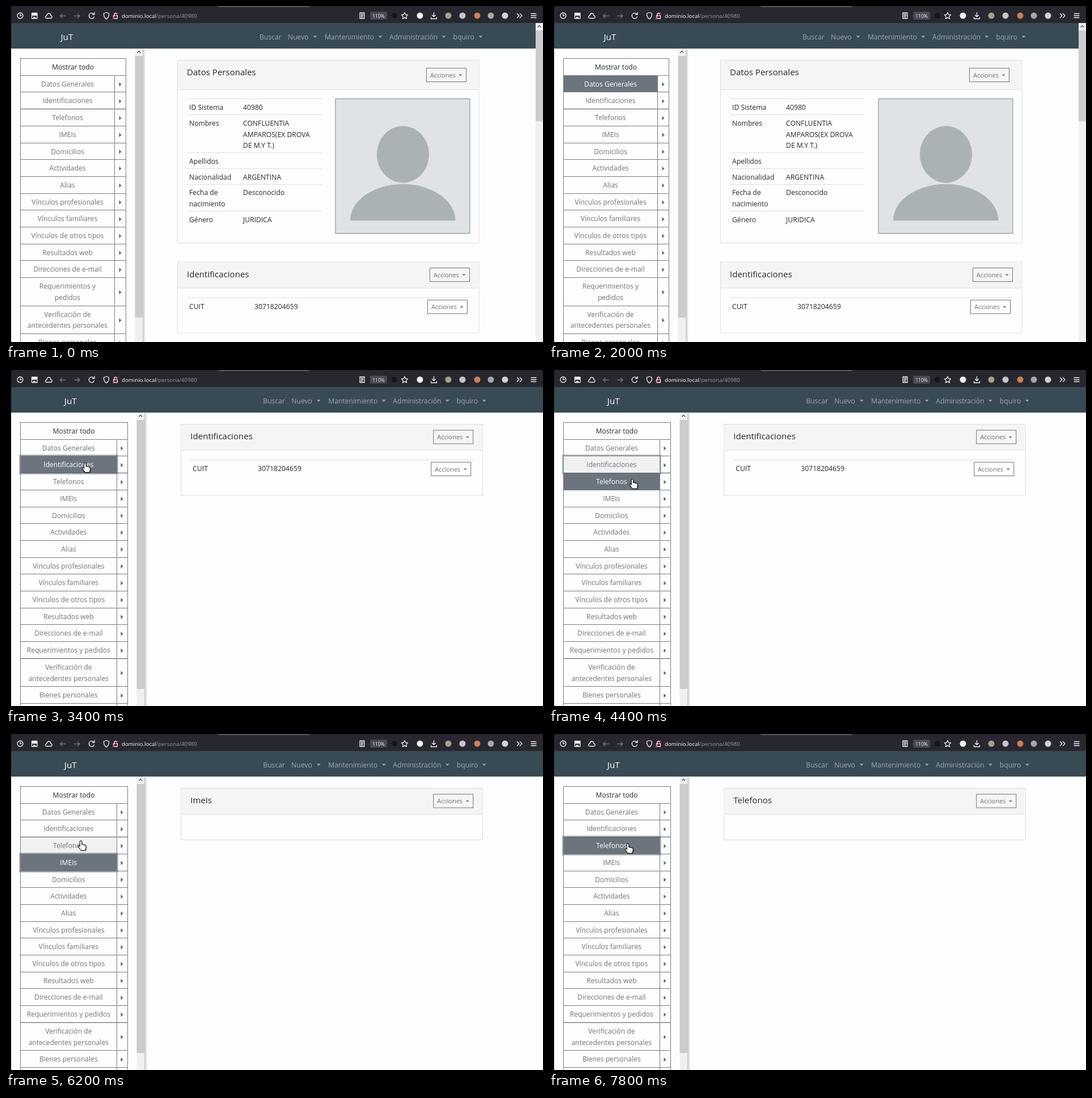
Animation, 947 px wide and 592 px high, one loop 8000 ms. Source, as an HTML page:

```html
<!DOCTYPE html>
<html lang="es">
<head>
<meta charset="utf-8">
<title>Ficha de persona</title>
<style>
html, body { margin: 0; width: 100%; height: 100%; overflow: hidden; background: #fdfdfd; }
svg { position: absolute; left: 0; top: 0; display: block; }
text { font-family: "Open Sans", "Noto Sans", sans-serif; white-space: pre; }
</style>
</head>
<body>
<svg width="947" height="592" viewBox="0 0 947 592">
  <g id="scene"></g>
  <g id="chrome"></g>
  <g id="hand">
    <path id="palm" d="M-1.7 1.2q1.7-2.4 3.4 0v5l5.6 1.4q2.2.7 2 3l-1.1 6.4h-8.2l-4.6-6.4q-.7-2.2 1.2-2l1.7 1.4z"
      fill="#000" opacity=".3" transform="translate(1.5 1.5)"/>
    <path d="M-1.7 1.2q1.7-2.4 3.4 0v5l5.6 1.4q2.2.7 2 3l-1.1 6.4h-8.2l-4.6-6.4q-.7-2.2 1.2-2l1.7 1.4z"
      fill="#fff" stroke="#111" stroke-width="1.1"/>
  </g>
</svg>
<script>
const LOOP = 8000, STEP = 200;
const GREY = '#6c757d', INK = '#24292d', RULE = '#dcdee2';
const byId = id => document.getElementById(id);

const rect = (x, y, w, h, fill, extra = '') =>
  `<rect x="${x}" y="${y}" width="${w}" height="${h}" fill="${fill}" ${extra}/>`;
const frame = (x, y, w, h, stroke, fill = 'none') =>
  rect(x + .5, y + .5, w - 1, h - 1, fill, `stroke="${stroke}"`);
const text = (x, y, str, size = 12.2, fill = INK, anchor = 'start') =>
  `<text x="${x}" y="${y}" font-size="${size}" fill="${fill}" text-anchor="${anchor}">${str}</text>`;
const path = (d, fill, stroke = 'none', width = 1.3) =>
  `<path d="${d}" fill="${fill}" stroke="${stroke}" stroke-width="${width}" stroke-linecap="round" stroke-linejoin="round"/>`;
const dot = (x, fill, r = 5.5) => `<circle cx="${x}" cy="17" r="${r}" fill="${fill}"/>`;
const shift = (dx, dy, body) => `<g transform="translate(${dx} ${dy})">${body}</g>`;
const caretDown = (x, y, fill, r = 3.5) => path(`M${x - r} ${y}h${2 * r}l${-r} ${r}z`, fill);
const hline = (x1, x2, y, stroke = RULE) => rect(x1, y, x2 - x1, 1, stroke);

function browserBar() {
  const light = '#f0f0f4', dim = '#77767f';
  const stroke = d => path(d, 'none', light);
  return rect(0, 0, 947, 30, '#28272f') + rect(0, 0, 9, 592, '#000') +
    rect(374, 0, 161, 2, '#56555f') +
    stroke('M30 17a5 5 0 1 1-10 0a5 5 0 1 1 10 0M25 14v3.2h2.5') +
    stroke('M45.500 12.500h9.500v9.500h-9.500z') + path('M46 13h9v4h-9zM48 19h4v3h-4z', light) +
    stroke('M71 21.500q-2.500-1-1-3.500q1-1 2-1q.5-4 3.500-4t3.500 4q3 .5 2 3q-.5 1.500-2 1.500z') +
    path('M105 17.500h-9.500M99 14l-3.500 3.500l3.500 3.500M120.500 17.500h9.500M126.500 14l3.500 3.500l-3.500 3.500', 'none', dim) +
    stroke('M155.500 19a4.800 4.800 0 1 1-.5-4.500M156 11.500v3.500h-3.500') +
    stroke('M177 11.500l4.500 1.500q.5 7-4.500 10q-5-3-4.500-10z') +
    stroke('M189.500 17h7v5h-7zM191 17v-2.500a2 2 0 0 1 4 0v2.500') +
    path('M188.500 22.500l9-10', 'none', '#e22850', 1.5) +
    text(204, 21, 'dominio.local<tspan fill="#9c9ba4">/persona/40980</tspan>', 9.7, '#fbfbfe') +
    stroke('M624 12h8v10h-8zM626 14.500h4M626 17h4M626 19.500h3') +
    rect(642, 10, 30, 14, '#4a4953', 'rx="2"') + text(657, 20.5, '110%', 8.5, light, 'middle') +
    dot(685, '#15141a', 5) +
    stroke('M703 11.500l1.700 3.600l4 .5l-2.900 2.800l.7 4l-3.500-2l-3.500 2l.7-4l-2.900-2.800l4-.5z') +
    dot(730, light) +
    stroke('M754.500 11.500v7M751.500 16l3 3l3-3M749.500 20v2.500h10v-2.500') +
    dot(780, '#a9a08a') + dot(805, '#c4c4c9') + dot(831, '#c9805c') + dot(855, '#a5a5ac') + dot(880, '#d2d2d7') +
    stroke('M901.500 13.500l3.500 3.500l-3.500 3.500M906.500 13.500l3.500 3.500l-3.500 3.500') +
    stroke('M926 13.500h9M926 17h9M926 20.500h9');
}

function scrollbar(x, y, w, top, end) {
  const mid = x + w / 2;
  return rect(x, y, w, 592 - y, '#f0f0ef') + rect(x, top, w, end - top, '#cbcccd') +
    path(`M${mid - 2.5} ${y + 7}l2.500-2.500l2.500 2.500`, 'none', '#505050', 1.4);
}

function navbar(wide) {
  const pale = '#a0a9ae';
  const links = [[447, 'Buscar'], [497, 'Nuevo', 545], [562, 'Mantenimiento', 660],
    [676, 'Administración', 772], [788.5, 'bquiro', 837]];
  return rect(9, 30, wide ? 938 : 925, 45, '#384a54') + shift(wide ? 6.3 : 0, 0,
    text(96.5, 59.5, 'JuT', 15.3, '#fff') +
    links.map(([x, label, caret]) => text(x, 58.5, label, 12.15, pale) +
      (caret ? caretDown(caret, 52.5, pale) : '')).join(''));
}

function menu({ wide, dark, light, focus }) {
  const items = ['Mostrar todo', 'Datos Generales', 'Identificaciones', 'Telefonos', 'IMEIs', 'Domicilios',
    'Actividades', 'Alias', 'Vínculos profesionales', 'Vínculos familiares', 'Vínculos de otros tipos',
    'Resultados web', 'Direcciones de e-mail', wide ? 'Requerimientos y pedidos' : 'Requerimientos y|pedidos',
    'Verificación de|antecedentes personales', 'Bienes personales', ''];
  const right = wide ? 214 : 211, split = wide ? 195 : 191, thick = wide ? 14 : 3;
  let y = 92, out = '', ring = '';
  items.forEach((label, i) => {
    const lines = label.split('|');
    const h = 9.9 + 19.8 * lines.length, mid = y + h / 2;
    const top = Math.round(y), bottom = Math.round(y + h);
    if (i === dark) out += rect(25, top, split - 25, bottom - top, GREY);
    if (i === light) out += rect(25, top, split - 25, bottom - top, '#f0f1f0');
    out += hline(25, right + 1, top, i === thick || (wide && i === 3) ? '#4d5462' : '#747b88');
    const cx = i ? (wide ? 110.3 : 108.5) : (25 + right) / 2;
    lines.forEach((line, n) => {
      const base = mid + 5.2 + 19.6 * (n - (lines.length - 1) / 2);
      out += text(cx, base, line, 12.1, i === dark ? '#fff' : i ? GREY : INK, 'middle');
    });
    if (i) {
      out += rect(split, top, 1, h, '#747b88') +
        path(`M${right - 11.5} ${mid - 2.3}l4 3.800l-4 3.800z`, '#5f6870');
    }
    if (i && i === focus) {
      ring = rect(24.5, top - .5, split - 23, bottom - top + 2, 'none', 'stroke="#6c757d" stroke-opacity=".5" stroke-width="3"');
    }
    y += h;
  });
  return out + rect(25, 92, 1, 500, '#747b88') + rect(right, 92, 1, 500, '#747b88') + ring;
}

function sidebar(state) {
  const edge = state.wide ? 244 : 241;
  let shade = '';
  for (let i = 0; i < 5; i++) shade += rect(edge + i, 76, 1, 516, '#000', `opacity="${.2 - i * .04}"`);
  return shade + scrollbar(edge - 13.5, 75, 13.5, 88, state.wide ? 562 : 549) + menu(state);
}

const button = (x, y, w = 71) => frame(x, y, w, 25, GREY) +
  text(x + 7, y + 16.9, 'Acciones', 11, GREY) + caretDown(x + 60.5, y + 11.5, GREY, 3);

const card = (title, h, head) => frame(302, 95, 532.5, h, RULE) +
  rect(303, 96, 530.5, head - 1, '#f5f5f4') + hline(303, 833.5, 95 + head) +
  text(319, 122.3, title, 15.05);

function personCard() {
  const rows = [[163, 182.8, 'ID Sistema', '40980'], [191, 211, 'Nombres', 'CONFLUENTIA|AMPAROS(EX DROVA|DE M.Y T.)'],
    [258, 277.6, 'Apellidos', ''], [286, 305.5, 'Nacionalidad', 'ARGENTINA'],
    [314, 333.3, 'Fecha de|nacimiento', 'Desconocido'], [361, 380.5, 'Género', 'JURIDICA']];
  const cell = (x, y, str) => str.split('|').map((s, i) => text(x, y + i * 19.5, s)).join('');
  return card('Datos Personales', 323, 52) + button(741, 109) +
    rows.map(([line, y, name, value]) => hline(319, 556, line) + cell(323, y, name) + cell(418, y, value)).join('') +
    frame(580.5, 163, 238, 238, '#7d848a', '#e0e3e6') +
    '<ellipse cx="700" cy="261.500" rx="46" ry="50" fill="#abb2b6"/>' +
    path('M607 378a92.500 64 0 0 1 185.500 0z', '#abb2b6');
}

const idCard = () => card('Identificaciones', 126, 46) + button(747, 105.5) + hline(319, 818, 158) +
  text(323, 178, 'CUIT') + text(438, 178, '30718204659') + button(743, 162);
const emptyCard = title => card(title, 92, 46) + button(747, 105.5);

const pages = {
  all: () => personCard() + shift(0, 355.5, idCard()),
  person: personCard,
  ids: idCard,
  phones: () => emptyCard('Telefonos'),
  imeis: () => emptyCard('Imeis')
};

// start time, page, filled item, fading item, focused item
const states = [
  [0, 'all'], [600, 'all', 2], [1400, 'all', 1],
  [2200, 'person', 1, 0, 1], [2400, 'person', 2, 1, 1], [2600, 'person', 2, 0, 1],
  [3000, 'ids', 2, 0, 2], [4400, 'ids', 3, 2, 2], [4600, 'ids', 3, 0, 2],
  [4800, 'phones', 3, 0, 3], [5200, 'phones', 4, 3, 3], [5400, 'phones', 4, 0, 3],
  [5600, 'imeis', 4, 0, 4], [6200, 'imeis', 4, 3, 4], [6400, 'imeis', 3, 0, 4],
  [6800, 'phones', 3, 0, 3]
];

// time, x, y of the fingertip
const trail = [[2200, 136, 132], [2400, 137, 150], [2600, 138, 162], [3800, 140, 164], [4200, 144, 178],
  [4400, 147, 192], [5000, 146, 195], [5400, 138, 218], [5800, 136, 218], [6200, 132, 188],
  [6600, 139, 193], [LOOP, 139, 193]];

function pointer(t) {
  const i = trail.findIndex(p => p[0] > t);
  const [a, b] = [trail[i - 1], trail[i]];
  const k = (t - a[0]) / (b[0] - a[0]);
  return [1, 2].map(n => a[n] + (b[n] - a[n]) * k);
}

function scene([, page, dark, light, focus]) {
  const wide = page !== 'all';
  return rect(9, 30, 938, 562, '#fdfdfd') + shift(wide ? 6.3 : 0, 0, pages[page]()) +
    sidebar({ wide, dark, light: light || -1, focus }) + navbar(wide) +
    (wide ? '' : scrollbar(934, 30, 13, 43, 203));
}

byId('chrome').innerHTML = browserBar();
const start = performance.now();
let shown;

function draw() {
  const t = Math.floor((performance.now() - start) % LOOP / STEP) * STEP;
  const state = states.filter(s => s[0] <= t).pop();
  if (state !== shown) byId('scene').innerHTML = scene(shown = state);
  const visible = t >= trail[0][0];
  byId('hand').style.display = visible ? '' : 'none';
  if (visible) byId('hand').setAttribute('transform', `translate(${pointer(t)})`);
  requestAnimationFrame(draw);
}
draw();
</script>
</body>
</html>
```
